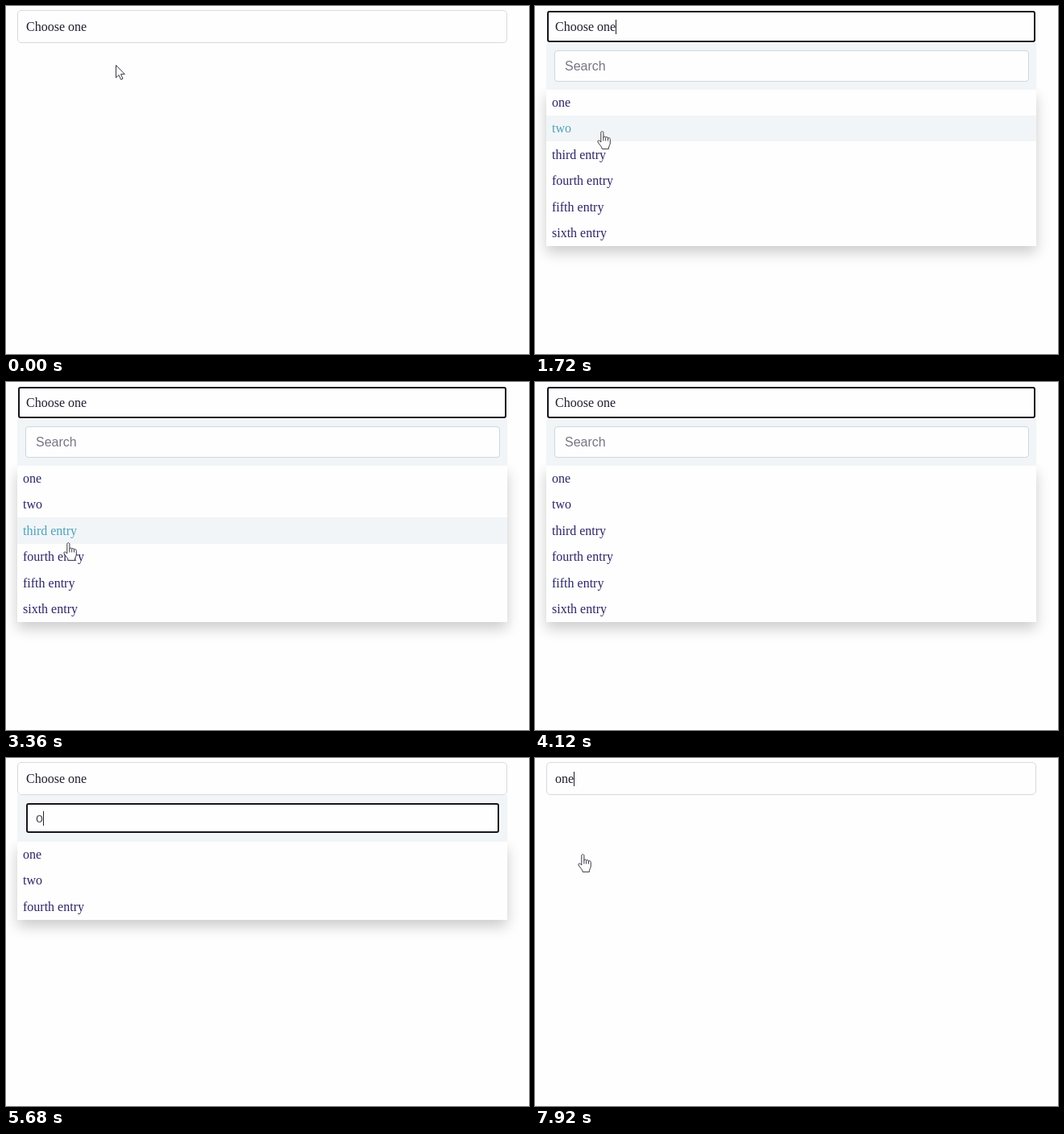
These frames come from a looping animation (649x432 px, 8 s). An HTML page:

```html
<!DOCTYPE html>
<html lang="en">
<head>
<meta charset="utf-8">
<title>Searchable dropdown</title>
<style>
  html, body { margin: 0; width: 100%; height: 100%; overflow: hidden; background: #fdfefd; }
  body { position: relative; font: 16px/20px "Liberation Serif", "Times New Roman", serif; }
  div, svg { position: absolute; box-sizing: border-box; }
  div { white-space: pre; }
  .field, .search { background: #fefefe; border: 1px solid #dcd8dc; border-radius: 5px; }
  .field { left: 14px; top: 5px; width: 608px; height: 41px; padding: 10px 0 0 10px; color: #211c2c; }
  .panel { left: 14px; top: 46px; width: 608px; height: 58px; background: #f1f5f8; }
  .search { left: 10px; top: 9px; width: 589px; height: 39px; padding: 9px 0 0 12px; border-color: #cdd7de;
    border-radius: 4px; font-family: "Liberation Sans", Arial, sans-serif; color: #565462; }
  .empty { color: #777684; }
  .focus { border-color: transparent; box-shadow: inset 0 0 0 2px #17131c; border-radius: 4px; }
  .focus.field { padding-left: 10px; }
  .list { left: 14px; top: 103.6px; width: 608px; background: #fefefe;
    box-shadow: 0 8px 16px rgba(0, 0, 0, .2); color: #2c2664; }
  .row { left: 0; width: 608px; height: 32.4px; padding: 6.4px 0 0 7px; }
  .hover { background: #f1f5f8; color: #4ea3b9; }
  .caret { display: inline-block; width: 1px; height: 18px; margin: 0 -1px 0 0; vertical-align: -4px; background: #222; }
  .off { visibility: hidden; }
  svg { left: 0; top: 0; overflow: visible; fill: #fefefe; stroke: #3a3840; stroke-linejoin: round; }
</style>
</head>
<body>
<div class="list" id="list"></div>
<div class="panel" id="panel"><div class="search" id="search"></div></div>
<div class="field" id="field"></div>
<svg id="arrow" width="13" height="20"><path d="M.5 .5V16L4 12.7 6.6 18.3 9 17.2 6.5 11.7H11.3Z"/></svg>
<svg id="hand" width="18" height="25"><path d="M4.8 14V2.2C4.8 .1 7.9 .1 7.9 2.2V8.2C8.3 6.5 10.7 6.7 10.7 8.4 11.2 7.1 13.4 7.4 13.5 9.1 14.2 8.2 16.3 8.7 16.3 10.4V15C16.3 17.5 14.4 18.8 14.3 22.4H6.2C6.1 19.2 2.7 17.2 1 13.9 .2 12.3 2.2 11.3 3.3 12.4Z"/><path d="M7.9 8V12.5M10.7 8.6V12.5M13.5 9.2V12.5" fill="none"/></svg>
<script>
const LOOP = 8000;
const ENTRIES = ["one", "two", "third entry", "fourth entry", "fifth entry", "sixth entry"];
const INIT = { open: false, focus: "", caret: false, value: "Choose one", query: "", hover: -1, hand: null, arrow: [136, 73] };

// Each step changes part of the state from its time on.
const STEPS = [
  [440, { open: true, focus: "field", caret: true, arrow: null }],
  [840, { hover: 0, hand: [87, 114] }],
  [1280, { hand: [85, 130], caret: false }],
  [1480, { hover: 1, hand: [83, 147] }],
  [1720, { hand: [83, 155], caret: true }],
  [2080, { hover: 2, hand: [82, 176] }],
  [2240, { hover: 3, hand: [81, 204], caret: false }],
  [2360, { hand: [81, 216] }],
  [2720, { hover: 4, hand: [80, 240], caret: true }],
  [2880, { hover: 5, hand: [79, 272] }],
  [3040, { hand: [79, 280] }],
  [3200, { hover: 4, hand: [78, 244] }],
  [3360, { hover: 2, hand: [77, 199], caret: false }],
  [3520, { hover: 1, hand: [77, 158] }],
  [3600, { hover: 0, hand: [77, 122] }],
  [3720, { hover: -1, hand: null }],
  [3880, { caret: true }],
  [4120, { caret: false }],
  [4200, { focus: "search", caret: true }],
  [4680, { caret: false }],
  [5200, { caret: true }],
  [5680, { query: "o" }],
  [5920, { query: "on" }],
  [6320, { query: "one" }],
  [6920, { caret: false }],
  [7280, { caret: true }],
  [7680, { hover: 0, hand: [59, 119] }],
  [7920, { open: false, focus: "", value: "one", hover: -1 }]
];

const el = id => document.getElementById(id);
const caret = on => `<span class="caret${on ? "" : " off"}"></span>`;

function place(node, pos, dx) {
  node.style.display = pos ? "" : "none";
  if (pos) node.style.transform = `translate(${pos[0] - dx}px, ${pos[1]}px)`;
}

function draw(s) {
  const inSearch = s.focus === "search";
  const field = el("field"), search = el("search"), list = el("list");
  field.className = s.focus === "field" ? "field focus" : "field";
  field.innerHTML = s.value + caret(s.caret && !inSearch);
  search.className = "search" + (inSearch ? " focus" : "") + (s.query ? "" : " empty");
  const mark = caret(s.caret && inSearch);
  search.innerHTML = s.query ? s.query + mark : mark + "Search";
  const rows = ENTRIES.filter(e => e.includes(s.query));
  list.innerHTML = rows.map((e, i) =>
    `<div class="row${i === s.hover ? " hover" : ""}" style="top:${i * 32.4}px">${e}</div>`).join("");
  list.style.height = rows.length * 32.4 + "px";
  list.style.display = el("panel").style.display = s.open ? "" : "none";
  place(el("arrow"), s.arrow, 0);
  place(el("hand"), s.hand, 6);
}

let shown = -1;
function tick(now) {
  const t = now % LOOP;
  const past = STEPS.filter(([at]) => at <= t);
  if (past.length !== shown) {
    shown = past.length;
    draw(Object.assign({}, INIT, ...past.map(step => step[1])));
  }
  requestAnimationFrame(tick);
}
const start = performance.now();
const frame = () => Math.max(0, performance.now() - start);
tick(0);
function loop() {
  tick(frame());
}
</script>
</body>
</html>
```
